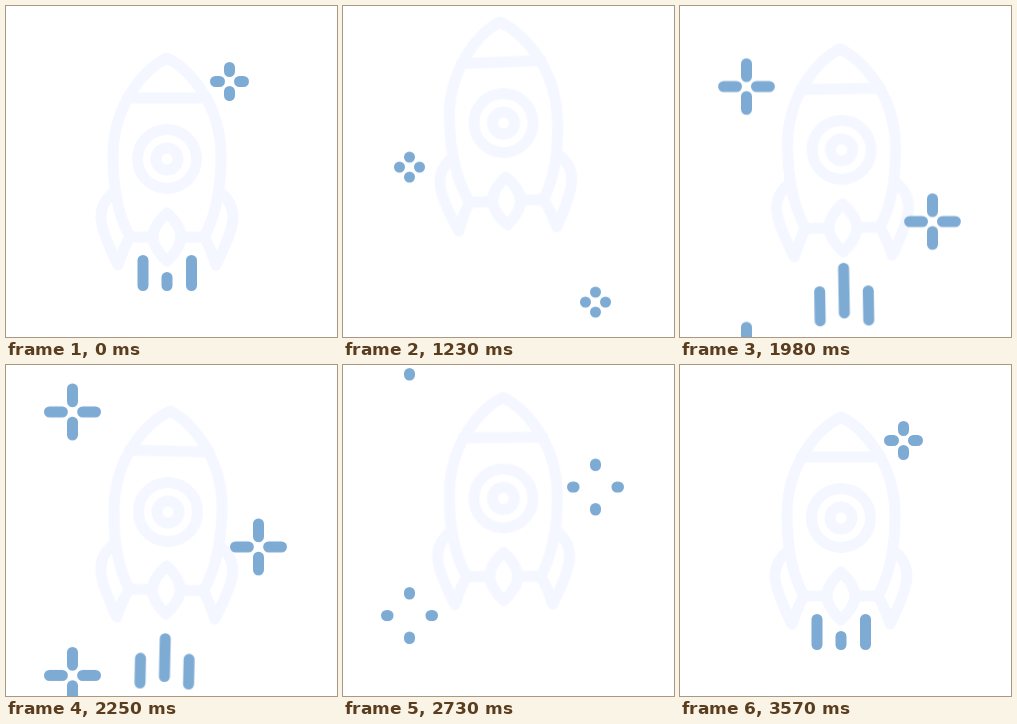
An HTML page for the animation above (3.6 s loop, 331x331 px).

```html
<!DOCTYPE html>
<html lang="en">
<head>
<meta charset="utf-8">
<title>Rocket</title>
<style>
  html, body { margin: 0; width: 100%; height: 100%; overflow: hidden; background: #fff; }
  svg { display: block; width: 100vw; height: 100vh; }
  g { animation: 3600ms ease-in-out infinite; }
  .line { fill: none; stroke-width: 11; stroke-linecap: round; stroke-linejoin: round; }
  .blue { stroke: #7eabd4; }
  .pale { stroke: #f4f7ff; }

  /* rocket: drift and sway */
  .drift { animation-name: drift; }
  .sway { animation-name: sway; transform-origin: 161px 153px; animation-timing-function: cubic-bezier(.37, 0, .63, 1); }
  @keyframes drift {
    0%, 8.333% { transform: translate(0, 0); }
    34.167% { transform: translate(-.5px, -36px); }
    46.667% { transform: translate(0, -13px); }
    62.5% { transform: translate(1px, -6px); }
    69.167% { transform: translate(1px, -22px); }
    84.167% { transform: translate(-3px, -16px); }
    99.167%, 100% { transform: translate(0, 0); }
  }
  @keyframes sway {
    0%, 16.667% { transform: rotate(0deg); }
    25.417% { transform: rotate(2.3deg); }
    34.167% { transform: rotate(-2.3deg); }
    42.917% { transform: rotate(2.3deg); }
    51.667% { transform: rotate(-2.3deg); }
    60.417% { transform: rotate(1.8deg); }
    69.167% { transform: rotate(-2.3deg); }
    77.778%, 100% { transform: rotate(0deg); }
  }

  /* strokes: every line is 100 units long */
  .side { animation-name: side; }
  .mid { animation-name: mid; }
  .spark { animation-name: spark; }
  .trail { animation-name: trail; }
  .stars { animation-name: stars; }
  .rise { animation-name: rise; animation-timing-function: linear; }
  @keyframes side {
    0%, 12.222% { stroke-dasharray: 100 300; visibility: visible; }
    30% { stroke-dasharray: 0 300; visibility: visible; }
    30.01%, 76.66% { stroke-dasharray: 0 300; visibility: hidden; }
    76.667% { stroke-dasharray: 0 300; visibility: visible; }
    87.5%, 100% { stroke-dasharray: 100 300; visibility: visible; }
  }
  @keyframes mid {
    0%, 6.667% { stroke-dasharray: 100 300; visibility: visible; }
    22.222% { stroke-dasharray: 0 300; visibility: visible; }
    22.23%, 79.99% { stroke-dasharray: 0 300; visibility: hidden; }
    80% { stroke-dasharray: 0 300; visibility: visible; }
    92.778%, 100% { stroke-dasharray: 100 300; visibility: visible; }
  }
  @keyframes spark {
    0% { stroke-dasharray: 100 300; visibility: visible; }
    25% { stroke-dasharray: 0 300; visibility: visible; }
    25.01%, 88.88% { stroke-dasharray: 0 300; visibility: hidden; }
    88.889% { stroke-dasharray: 0 300; visibility: visible; }
    99.167%, 100% { stroke-dasharray: 100 300; visibility: visible; }
  }
  @keyframes trail {
    0%, 38.88% { stroke-dasharray: 0 300; stroke-dashoffset: 0; visibility: hidden; }
    38.889% { stroke-dasharray: 0 300; stroke-dashoffset: 0; visibility: visible; }
    57.222% { stroke-dasharray: 100 300; stroke-dashoffset: 0; visibility: visible; }
    75.333% { stroke-dasharray: 100 300; stroke-dashoffset: -100; visibility: visible; }
    75.34%, 100% { stroke-dasharray: 100 300; stroke-dashoffset: -100; visibility: hidden; }
  }
  @keyframes stars {
    0%, 33.32% { stroke-dasharray: 0 300; stroke-dashoffset: 0; visibility: hidden; }
    33.333% { stroke-dasharray: 0 300; stroke-dashoffset: 0; visibility: visible; }
    56.667%, 61.111% { stroke-dasharray: 100 300; stroke-dashoffset: 0; visibility: visible; }
    80.556% { stroke-dasharray: 100 300; stroke-dashoffset: -100; visibility: visible; }
    80.56%, 100% { stroke-dasharray: 100 300; stroke-dashoffset: -100; visibility: hidden; }
  }
  @keyframes rise {
    0%, 33.333% { transform: translateY(116px); animation-timing-function: cubic-bezier(.33, .21, .67, .55); }
    46.667% { transform: translateY(71px); }
    62.5% { transform: translateY(0); }
    80.556%, 100% { transform: translateY(-81px); }
  }
</style>
</head>
<body>
<svg viewBox="0 0 331 331">
  <defs>
    <path id="star" pathLength="400" d="M10 0H23M-10 0H-23M0 10V23M0-10V-23"/>
    <path id="fin" d="M108 186C99 193 95 201 95 211C95 224 104 243 112 259C115 250 119 239 124 231H147"/>
  </defs>

  <g class="drift">
    <g class="sway line">
      <g class="pale">
        <path d="M124 231C114 213 107 185 107 150C107 97 140 62 161 52C182 62 215 97 215 150C215 185 208 213 198 231M121 92H201"/>
        <use href="#fin"/>
        <use href="#fin" transform="matrix(-1 0 0 1 322 0)"/>
        <path d="M161 207C151 216 147 225 147 231C147 238 153 248 161 255C169 248 175 238 175 231C175 225 171 216 161 207Z"/>
        <circle cx="161" cy="153" r="29.5"/>
        <circle cx="161" cy="153" r="11"/>
      </g>
      <g class="trail blue">
        <path pathLength="100" d="M136.7 294.5v30"/>
        <path pathLength="100" d="M161 271.5v46"/>
        <path pathLength="100" d="M185.3 294.5v30"/>
      </g>
    </g>
  </g>

  <g class="line blue">
    <g class="side">
      <path pathLength="100" d="M137 254.5v25"/>
      <path pathLength="100" d="M185.5 254.5v25"/>
    </g>
    <g class="mid"><path pathLength="100" d="M161 271.5v8"/></g>
    <g class="spark">
      <path pathLength="400" transform="translate(223.5 75.5)" d="M10 0H14M-10 0H-14M0 10V14M0-10V-14"/>
    </g>
    <g class="rise">
      <g class="stars">
        <use href="#star" x="66.5" y="47"/>
        <use href="#star" x="66.5" y="310.5"/>
        <use href="#star" x="252.5" y="182"/>
      </g>
    </g>
  </g>
</svg>
</body>
</html>
```
